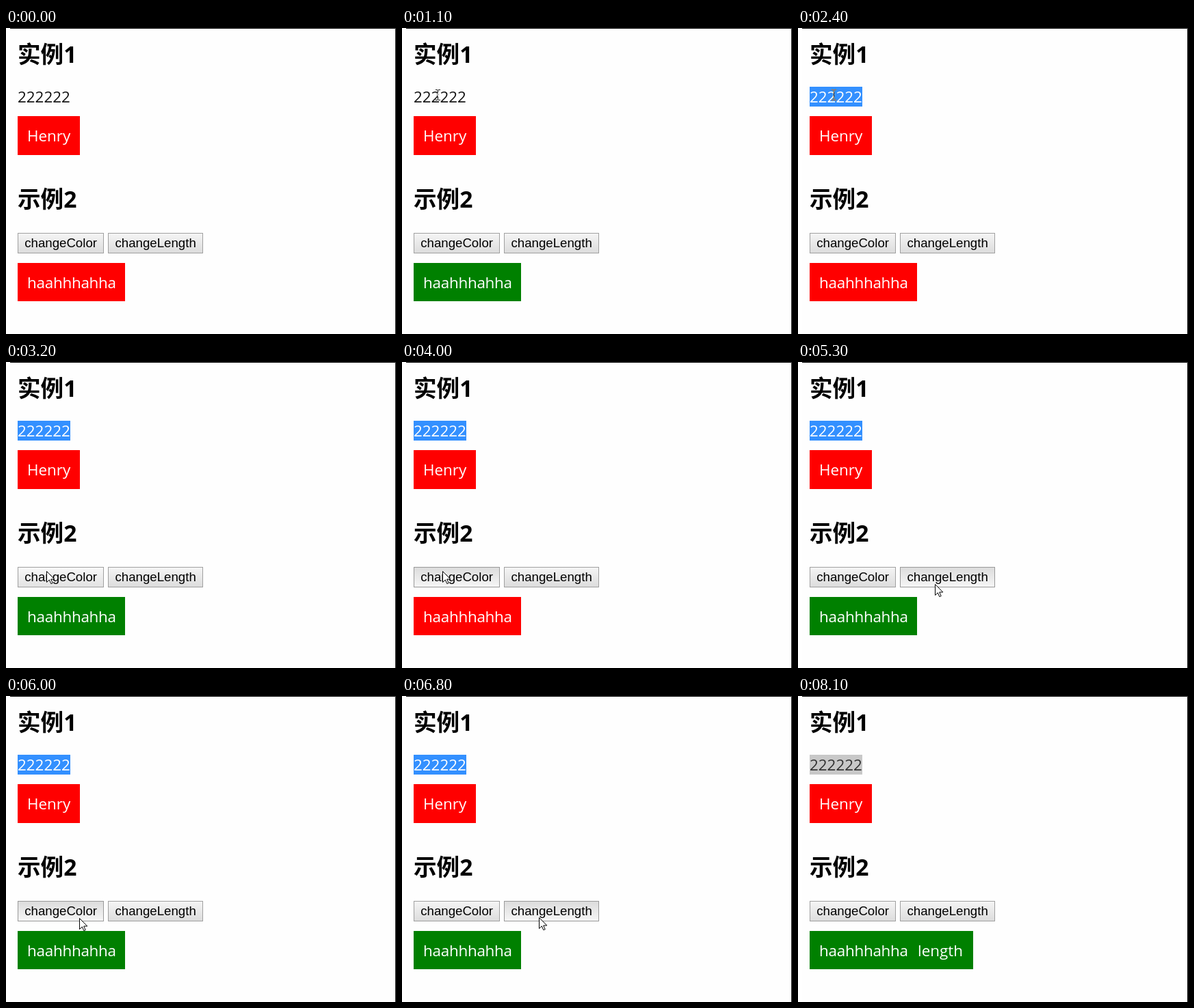
An HTML page that plays this animation: 570 by 448 pixels, repeating every 8200 ms.

```html
<!DOCTYPE html>
<html lang="zh">
<head>
<meta charset="utf-8">
<title>Demo</title>
<style>
  html, body { margin: 0; width: 100%; height: 100%; overflow: hidden; background: #fff; }
  svg { display: block; width: 570px; height: 448px; }
  text { font: 22.4px "Open Sans", "Noto Sans", sans-serif; white-space: pre; }
  .title { font: bold 33.6px "Open Sans", "Noto Sans CJK SC", "Noto Sans CJK", sans-serif; }
  .white { fill: #fff; }
  .label { font: 18.67px "Liberation Sans", Arial, sans-serif; }
  .button rect { fill: url(#idle); stroke: #a0a0a0; }
  .button.hover rect { fill: url(#hover); }
  .button.down rect { fill: url(#down); stroke: #999; }
  #picked { fill: none; }
  #digits { fill: #111; }
  .selected #picked { fill: #3390ff; }
  .selected #digits { fill: #fff; }
  .blurred #picked { fill: #c8c8c8; }
  .blurred #digits { fill: #323232; }
  #beam { fill: none; stroke: #fff; mix-blend-mode: difference; }
  #arrow { fill: #fff; stroke: #000; }
</style>
</head>
<body>
<svg viewBox="0 0 570 448">
  <defs>
    <linearGradient id="idle" x2="0" y2="1"><stop stop-color="#f5f5f5"/><stop offset="1" stop-color="#dcdcdc"/></linearGradient>
    <linearGradient id="hover" x2="0" y2="1"><stop stop-color="#f8f8f8"/><stop offset="1" stop-color="#e2e2e2"/></linearGradient>
    <linearGradient id="down" x2="0" y2="1"><stop stop-color="#dcdcdc"/><stop offset="1" stop-color="#f6f6f6"/></linearGradient>
  </defs>
  <rect width="570" height="448" fill="#fff"/>
  <rect x="6" width="564" height="448" fill="#fefefe"/>
  <path d="M6 .5H569.5V448" fill="none" stroke="#000"/>

  <text class="title" x="17" y="51">实例1</text>
  <g id="line">
    <rect id="picked" x="17" y="86" width="77" height="29"/>
    <text id="digits" x="17" y="109">222222</text>
  </g>
  <rect x="17" y="129" width="91" height="57" fill="#f00"/>
  <text class="white" x="31" y="166">Henry</text>

  <text class="title" x="17" y="263">示例2</text>
  <g class="button" id="colorBtn">
    <rect x="17.5" y="300.5" width="125" height="29"/>
    <text class="label" x="27.2" y="321">changeColor</text>
  </g>
  <g class="button" id="lengthBtn">
    <rect x="149.5" y="300.5" width="138" height="29"/>
    <text class="label" x="159.5" y="321">changeLength</text>
  </g>
  <rect id="box" x="17" y="344" width="157" height="56" fill="#f00"/>
  <text class="white" x="31" y="381" letter-spacing="-.25">haahhhahha</text>
  <text class="white" id="extra" x="175" y="381">length</text>

  <path id="beam" d="M-3 -7.5H0M1 -7.5H4M.5 -7V7M-3 7.5H0M1 7.5H4"/>
  <path id="arrow" d="M.5 .5V16.5L4.3 12.9 6.8 18.6 9.2 17.6 6.7 12H11.8Z"/>
</svg>
<script>
const LOOP = 8200, TICK = 100;
const $ = id => document.getElementById(id);

const colorToggles = [1100, 1500, 2000, 2400, 3200, 3600, 4100, 6100, 6600];
const lengthToggles = [4600, 5000, 5400, 5800, 6900];
const colorPresses = [3100, 3500, 4000, 6000, 6500];
const lengthPresses = [4500, 4900, 5300, 5700, 6800];

// Pointer stops: time, x, y, shape
const stops = [
  [0, 0, 0, ''],
  [100, 171, 163, 'arrow'], [200, 132, 178, 'arrow'], [300, 110, 166, 'arrow'],
  [400, 88, 146, 'beam'], [500, 72, 128, 'beam'], [600, 60, 112, 'beam'],
  [700, 53, 104, 'beam'], [800, 50, 100, 'beam'], [900, 49, 99, 'beam'],
  [1000, 52, 98, 'beam'],
  [2600, 53, 112, 'beam'], [2700, 56, 155, 'beam'], [2800, 60, 215, 'arrow'],
  [2900, 58, 275, 'arrow'], [3000, 59, 306, 'arrow'],
  [4200, 128, 318, 'arrow'], [4300, 200, 325, 'arrow'],
  [5900, 185, 325, 'arrow'], [6000, 107, 325, 'arrow'],
  [6200, 106, 324, 'arrow'], [6300, 107, 325, 'arrow'],
  [6700, 200, 324, 'arrow'], [7100, 230, 319, 'arrow'],
  [7200, 355, 252, 'arrow'], [7300, 532, 155, 'arrow'], [7400, 0, 0, '']
];

const isOn = (toggles, t) => toggles.filter(at => at <= t).length % 2 === 1;
const isDown = (presses, t) => presses.some(at => t >= at && t < at + TICK);

function setButton(id, left, right, presses, t, x, y) {
  const over = x >= left && x < right && y >= 300 && y < 330;
  $(id).setAttribute('class', 'button' + (isDown(presses, t) ? ' down' : over ? ' hover' : ''));
}

function render(t) {
  const [, x, y, shape] = stops.filter(s => s[0] <= t).pop();
  for (const id of ['arrow', 'beam']) {
    $(id).style.display = id === shape ? '' : 'none';
    $(id).setAttribute('transform', `translate(${x} ${y})`);
  }
  setButton('colorBtn', 17, 143, colorPresses, t, x, y);
  setButton('lengthBtn', 149, 288, lengthPresses, t, x, y);

  const long = isOn(lengthToggles, t);
  $('box').setAttribute('fill', isOn(colorToggles, t) ? '#008000' : '#f00');
  $('box').setAttribute('width', long ? 239 : 157);
  $('extra').style.display = long ? '' : 'none';
  $('line').setAttribute('class', t >= 8100 ? 'blurred' : t >= 1400 ? 'selected' : '');
}

const start = performance.now();
function frame() {
  render((performance.now() - start) % LOOP);
  requestAnimationFrame(frame);
}
frame();
</script>
</body>
</html>
```
